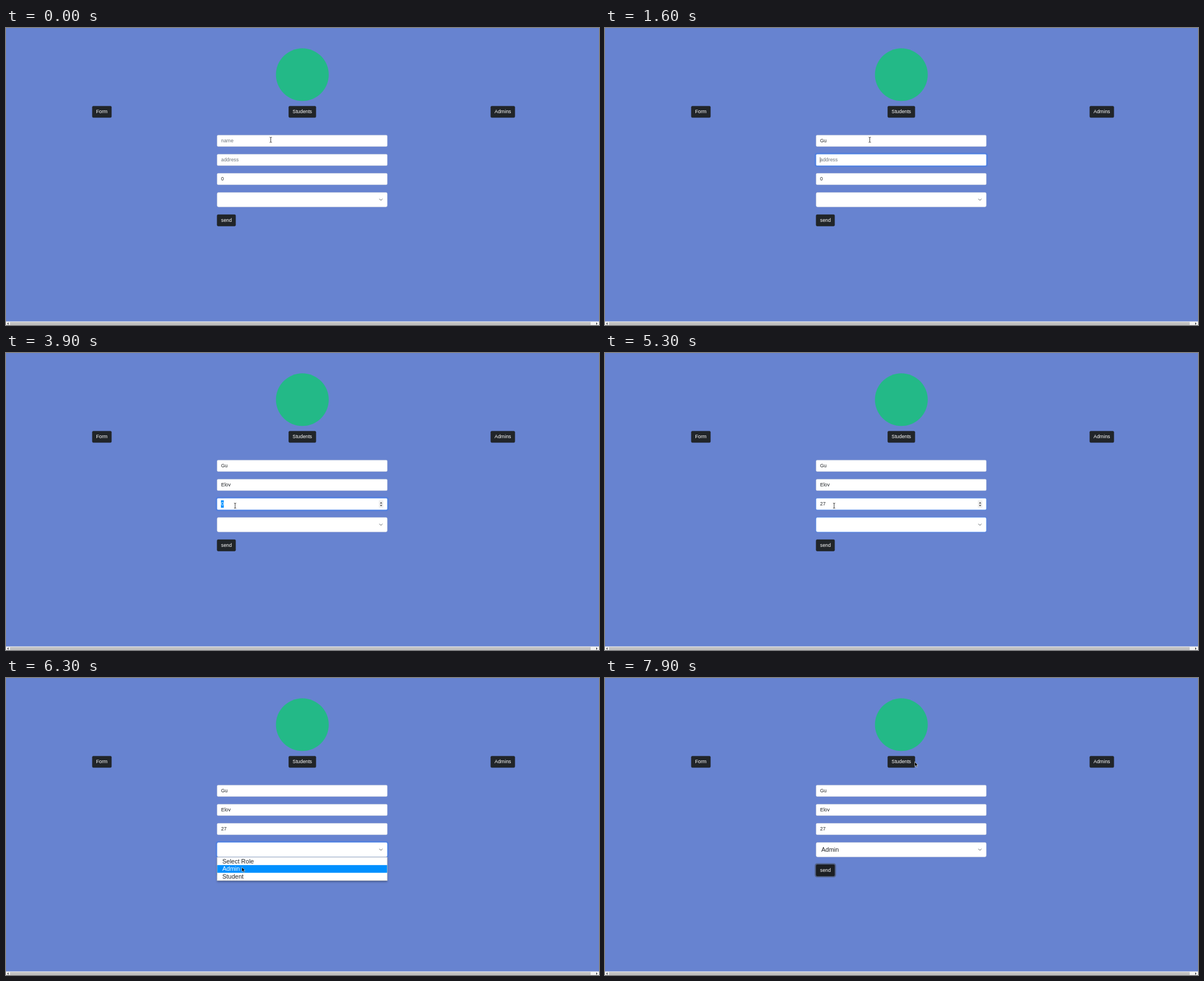
Recreate the animation shown at these times as an HTML page. Size 1056x530 px, loop 8 s.

```html
<!DOCTYPE html>
<html lang="en">
<head>
<meta charset="utf-8">
<title>Registration form</title>
<style>
  html, body { margin: 0; width: 100%; height: 100%; overflow: hidden; background: #6783d0; }
  #page {
    position: absolute; left: 0; top: 0; width: 1920px; height: 964px; overflow: hidden;
    transform: scale(.55); transform-origin: 0 0;
    font: 16px/24px "Liberation Sans", Arial, sans-serif; color: #212529;
  }
  #page > * { position: absolute; box-sizing: border-box; white-space: pre; }
  .logo { left: 874px; top: 66px; width: 171px; height: 171px; border-radius: 50%; background: #23b987; }
  .btn { top: 253px; height: 38px; padding: 6px 12px; border: 1px solid #212529; border-radius: 4px; background: #212529; color: #fff; }
  .btn.hover { background: #1c1f23; border-color: #1a1e21; }
  .field { left: 683.4px; width: 552px; height: 38px; padding: 6px 12px; border: 1px solid #ced4da; border-radius: 4px; background: #fff; }
  #role { top: 533px; height: 48px; padding: 8px 16px; font-size: 20px; line-height: 30px; border-radius: 5px; }
  .field svg { position: absolute; right: 12px; top: 17px; }
  .hint { color: #6c757d; }
  .caret { position: absolute; width: 1px; height: 18px; margin-top: 3px; background: #000; }
  .sel { display: inline-block; background: #0090ff; color: #fff; }
  #spin { left: 1207.4px; top: 478px; background: #efefef; }
  #menu { left: 683.4px; top: 581px; width: 552px; border: 1px solid #8a8f98; background: #fff; font-size: 20px; line-height: 25px; box-shadow: 0 3px 6px rgba(0, 0, 0, .3); }
  #menu div { padding-left: 16px; }
  #menu .on { background: #0090ff; color: #fff; }
  .bar { left: 0; top: 952px; width: 1920px; height: 15px; background: #f1f1f1; }
  .thumb { left: 13px; top: 954px; width: 1880px; height: 11px; background: #c1c1c1; }
  .arrows { left: 0; top: 952px; }
  #mouse { left: 0; top: 0; overflow: visible; }
</style>
</head>
<body>
<div id="page">
  <div class="logo"></div>
  <div class="btn" style="left:278.6px">Form</div>
  <div class="btn" style="left:914.8px">Students</div>
  <div class="btn" style="left:1569px">Admins</div>
  <div class="field" id="name" style="top:347px"></div>
  <div class="field" id="address" style="top:409px"></div>
  <div class="field" id="age" style="top:471px"></div>
  <svg id="spin" width="15" height="24"><path d="M3.5 10l4-4.5 4 4.5zM3.5 15l4 4.5 4-4.5z" fill="#444"/></svg>
  <div class="field" id="role"><span></span><svg width="16" height="12" viewBox="-2.67 0 21.33 16"><path d="M2 5l6 6 6-6" fill="none" stroke="#343a40" stroke-width="2" stroke-linecap="round" stroke-linejoin="round"/></svg></div>
  <div class="btn" id="send" style="left:683.4px;top:605px">send</div>
  <div id="menu"><div>Select Role</div><div>Admin</div><div>Student</div></div>
  <div class="bar"></div>
  <div class="thumb"></div>
  <svg class="arrows" width="1920" height="12"><path d="M8 3v8l-4-4zM1911 3v8l4-4z" fill="#333"/></svg>
  <svg id="mouse" width="1" height="1"></svg>
</div>
<script>
const $ = id => document.getElementById(id);
const fields = ['name', 'address', 'age'];
const hints = { name: 'name', address: 'address', age: '' };

const beam = 'M-3.5-8.5Q0-8.5 0-6Q0-8.5 3.5-8.5M0-6V6M-3.5 8.5Q0 8.5 0 6Q0 8.5 3.5 8.5';
const cursors = {
  beam: `<path d="${beam}" fill="none" stroke="#fff" stroke-width="3"/><path d="${beam}" fill="none" stroke="#222" stroke-width="1.6"/>`,
  arrow: '<path d="M0 0V15L3.5 12L6 17.5L8.5 16.5L6 11H10.5Z" fill="#000" stroke="#fff"/>',
  hand: '<path d="M-2 9V1Q0-1 2 1V6L8 7.5Q10 8 9.5 11L8 17H-1L-5.5 11Q-5 8-2 11Z" fill="#000" stroke="#fff"/>'
};

// Each entry changes part of the state from its time on.
const steps = [
  [0, { name: '', address: '', age: '0', role: '', focus: {}, caret: '', picked: false,
        spin: false, menu: false, option: -1, hover: false, mouse: [471.5, 199.5, 'beam'] }],
  [300, { focus: { name: 1 }, caret: 'name' }],
  [800, { caret: '' }],
  [1100, { name: 'G', caret: 'name' }],
  [1300, { name: 'Gu' }],
  [1500, { focus: { name: .5, address: .5 }, caret: 'address' }],
  [1600, { focus: { address: 1 } }],
  [2100, { address: 'E' }],
  [2400, { address: 'El' }],
  [2500, { address: 'Elo' }],
  [2700, { address: 'Elov', mouse: [470.5, 199.5, 'beam'] }],
  [2800, { mouse: [436, 249, 'beam'] }],
  [3000, { mouse: [404, 264, 'beam'], spin: true }],
  [3100, { mouse: [390, 271, 'beam'] }],
  [3200, { mouse: [408, 272.5, 'beam'], caret: '' }],
  [3400, { focus: { age: 1 }, caret: 'age' }],
  [3800, { caret: '' }],
  [3900, { picked: true }],
  [4900, { age: '2', picked: false, caret: 'age' }],
  [5000, { age: '27' }],
  [5300, { focus: { age: .5, role: .5 }, caret: '' }],
  [5400, { focus: { role: 1 } }],
  [5600, { mouse: [512, 297, 'beam'] }],
  [5800, { mouse: [527, 306, 'arrow'], spin: false }],
  [5900, { mouse: [532, 309.5, 'arrow'] }],
  [6000, { menu: true }],
  [6200, { option: 0, mouse: [450, 328, 'arrow'] }],
  [6300, { option: 1, mouse: [420, 337.5, 'arrow'] }],
  [6600, { menu: false, role: 'Admin', mouse: [412, 336, 'arrow'] }],
  [6800, { mouse: [406, 338, 'arrow'], hover: true }],
  [6900, { mouse: [401, 340, 'arrow'] }],
  [7100, { mouse: [402, 340.5, 'hand'] }],
  [7300, { focus: { send: 1 } }],
  [7500, { mouse: [406, 335, 'hand'] }],
  [7600, { mouse: [432, 300, 'arrow'] }],
  [7700, { mouse: [467.5, 254, 'beam'], spin: true }],
  [7900, { mouse: [551.5, 149.5, 'arrow'], spin: false }]
];

function ring(id, level = 0) {
  const el = $(id), color = id === 'send' ? '66,70,73' : '13,110,253';
  el.style.boxShadow = level ? `0 0 0 ${4 * level}px rgba(${color},${id === 'send' ? .5 : .25 * level})` : '';
  if (id !== 'send') el.style.borderColor = level ? '#86b7fe' : '';
}

function draw(s) {
  for (const id of fields) {
    const text = s.picked && id === 'age' ? `<span class="sel">${s.age}</span>` : s[id];
    const caret = s.caret === id ? '<i class="caret"></i>' : '';
    const hint = s[id] ? '' : `<span class="hint">${hints[id]}</span>`;
    $(id).innerHTML = text + caret + hint;
  }
  for (const id of [...fields, 'role', 'send']) ring(id, s.focus[id]);
  $('role').firstChild.textContent = s.role;
  $('send').classList.toggle('hover', s.hover);
  $('spin').style.display = s.spin ? '' : 'none';
  $('menu').style.display = s.menu ? '' : 'none';
  [...$('menu').children].forEach((row, i) => row.classList.toggle('on', i === s.option));
  const [x, y, kind] = s.mouse;
  $('mouse').innerHTML = `<g transform="translate(${x / .55} ${y / .55})">${cursors[kind]}</g>`;
}

let shown = 0;
function tick() {
  const t = performance.now() % 8000;
  const past = steps.filter(step => step[0] <= t);
  if (past.length !== shown) {
    shown = past.length;
    draw(Object.assign({}, ...past.map(step => step[1])));
  }
  requestAnimationFrame(tick);
}
tick();
</script>
</body>
</html>
```
